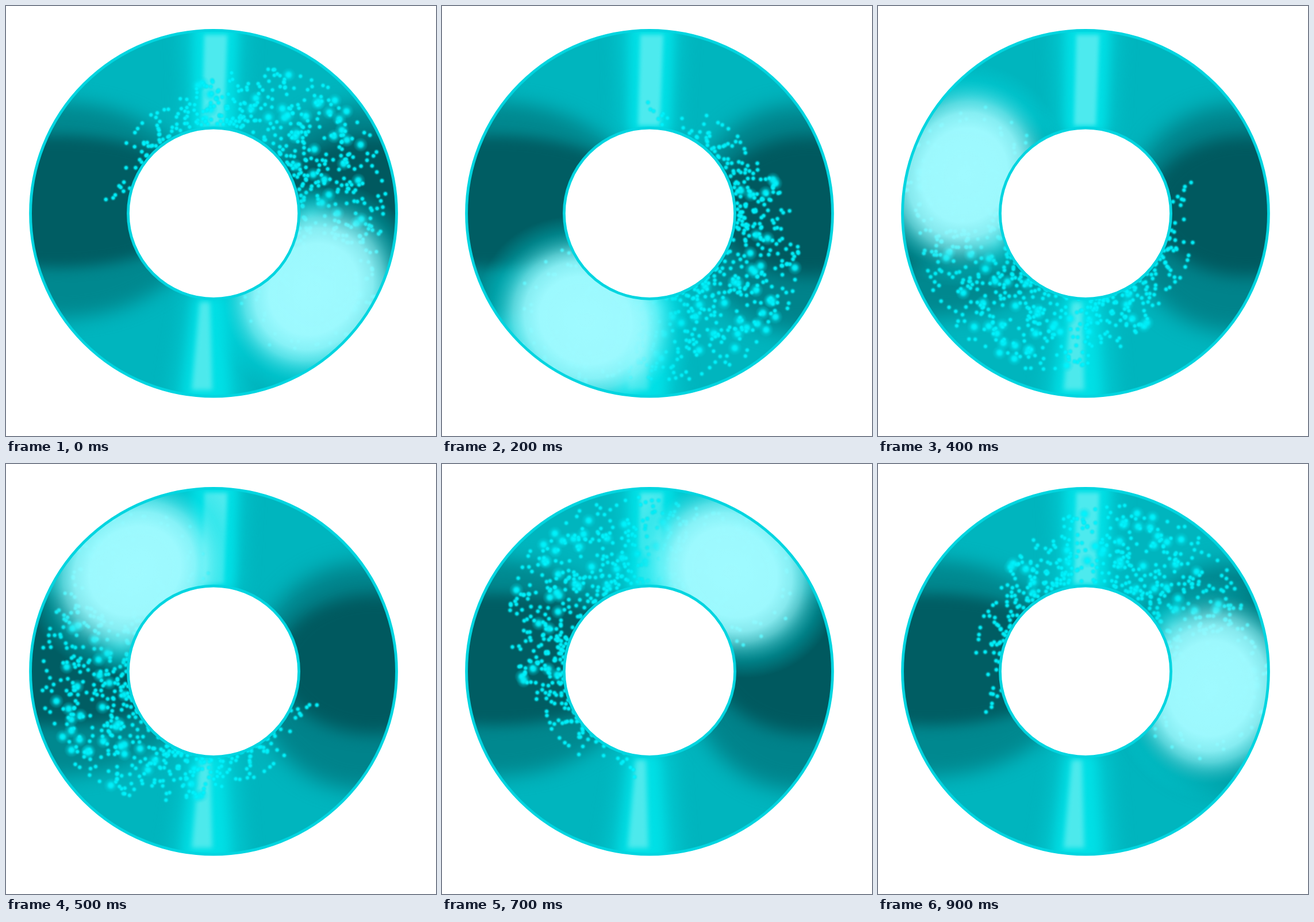
These frames come from a looping animation (748 px wide and 748 px high, 1 s). An HTML page with a canvas:

```html
<!DOCTYPE html>
<html lang="en">
<head>
<meta charset="utf-8">
<title>Glowing ring</title>
<style>
  html, body { margin: 0; width: 100%; height: 100%; overflow: hidden; background: #fff; }
  canvas { display: block; }
</style>
</head>
<body>
<canvas id="stage" width="748" height="748"></canvas>
<script>
const SIZE = 748, TAU = Math.PI * 2, RAD = Math.PI / 180;
const CX = 361, CY = 360.7, OUTER = 318.4, INNER = 148.6; // ring
const PX = 362, PY = 357;                                 // pivot of the sparks
const KEYS = [[0, 0], [3, 124], [5, 193], [7, 272], [10, 360]]; // step, degrees

const ctx = document.getElementById('stage').getContext('2d');

function layer() {
  const c = document.createElement('canvas');
  c.width = c.height = SIZE;
  return c.getContext('2d');
}

let seed = 7;
function rand() {
  seed = (seed * 16807) % 2147483647;
  return seed / 2147483647;
}

function turn(step) {
  const i = KEYS.findIndex(k => k[0] > step);
  const [s0, a0] = KEYS[i - 1], [s1, a1] = KEYS[i];
  return (a0 + (a1 - a0) * (step - s0) / (s1 - s0)) * RAD;
}

function metal() {
  const g = layer();
  const paint = (color, blur) => {
    g.filter = `blur(${blur}px)`;
    g.fillStyle = color;
    g.beginPath();
  };
  const shade = (color, blur, x, y, rx, ry) => {
    paint(color, blur);
    g.ellipse(x, y, rx, ry, 0, 0, TAU);
    g.fill();
  };
  // upright band from (x0, y0) to (x1, y1) with half widths w0 and w1
  const shine = (color, blur, x0, y0, w0, x1, y1, w1) => {
    paint(color, blur);
    g.moveTo(x0 - w0, y0);
    g.lineTo(x0 + w0, y0);
    g.lineTo(x1 + w1, y1);
    g.lineTo(x1 - w1, y1);
    g.fill();
  };

  g.fillStyle = '#00b5be';
  g.fillRect(0, 0, SIZE, SIZE);
  shade('#00888f', 16, 90, 355, 260, 188);
  shade('#005d63', 11, 90, 340, 260, 115);
  shade('#00838b', 18, 620, 370, 190, 198);
  shade('#00595f', 14, 640, 348, 170, 122);

  shine('#00ced6', 18, 362, 20, 52, 360, 225, 44);
  shine('#00e0e6', 9, 365, 30, 37, 361, 220, 34);
  shine('#4deaee', 3.5, 365, 50, 20, 360, 208, 19);
  shine('#00ced6', 18, 358, 495, 38, 350, 700, 62);
  shine('#00e0e6', 10, 353, 505, 24, 348, 690, 40);
  shine('#4de9ec', 4, 346, 515, 9, 341, 668, 18);
  return g.canvas;
}

function dot(g, x, y, r, core) {
  const grad = g.createRadialGradient(x, y, 0, x, y, r);
  grad.addColorStop(0, 'rgba(0,244,254,1)');
  grad.addColorStop(core, 'rgba(0,240,250,.9)');
  grad.addColorStop(core + (1 - core) * .45, 'rgba(0,228,238,.33)');
  grad.addColorStop(1, 'rgba(0,220,230,0)');
  g.fillStyle = grad;
  g.fillRect(x - r, y - r, 2 * r, 2 * r);
}

// dots along an arc: narrow at the tail, wide near the glow
function tail(g, count, mid, spread, bias, size, core) {
  for (let i = 0; i < count; i++) {
    const a = Math.min(mid + (rand() + rand() + rand() - 1.5) * spread, 45);
    const t = Math.min(Math.max((a + 130) / 100, 0), 1);
    const width = 48 + 102 * t * t * (3 - 2 * t);
    const r = 152 + width * rand() ** bias;
    dot(g, PX + r * Math.cos(a * RAD), PY + r * Math.sin(a * RAD), size, core);
  }
}

function glow(g, r, stops) {
  const grad = g.createRadialGradient(0, 0, 0, 0, 0, r);
  stops.forEach(([at, color]) => grad.addColorStop(at, `rgba(${color})`));
  g.fillStyle = grad;
  g.fillRect(-r, -r, 2 * r, 2 * r);
}

function sparks() {
  const g = layer();
  tail(g, 38, -42, 62, .8, 13, .28);
  tail(g, 460, -47, 96, 1.4, 5.6, .4);
  // rim of the glow
  for (let i = 0; i < 75; i++) {
    const a = rand() * TAU, r = 92 + 36 * rand();
    dot(g, 535 + r * Math.cos(a), 492 + r * Math.sin(a), 5.2, .4);
  }

  g.translate(PX, PY);
  g.save();
  g.translate(168, 8);
  glow(g, 55, [[0, '40,240,247,.6'], [.5, '20,232,240,.35'], [1, '0,225,232,0']]);
  g.restore();

  g.rotate(38 * RAD);
  g.translate(220, 0);
  g.scale(1, 1.12);
  glow(g, 175, [
    [0, '159,250,255,1'], [.42, '158,250,255,.99'], [.56, '148,248,253,.9'],
    [.66, '124,244,249,.7'], [.75, '70,234,240,.48'], [.85, '0,224,231,.28'], [1, '0,220,228,0']
  ]);
  return g.canvas;
}

const base = metal(), trail = sparks();

function ring() {
  ctx.beginPath();
  for (const r of [OUTER, INNER]) {
    ctx.moveTo(CX + r, CY);
    ctx.arc(CX, CY, r, 0, TAU);
  }
}

function draw(now) {
  ctx.fillStyle = '#fff';
  ctx.fillRect(0, 0, SIZE, SIZE);

  ctx.save();
  ring();
  ctx.clip('evenodd');
  ctx.drawImage(base, 0, 0);
  ctx.translate(PX, PY);
  ctx.rotate(turn(Math.floor(now / 100) % 10));
  ctx.drawImage(trail, -PX, -PY);
  ctx.restore();

  ring();
  ctx.strokeStyle = '#00d5e0';
  ctx.lineWidth = 4.8;
  ctx.stroke();
  requestAnimationFrame(draw);
}
requestAnimationFrame(draw);
</script>
</body>
</html>
```
